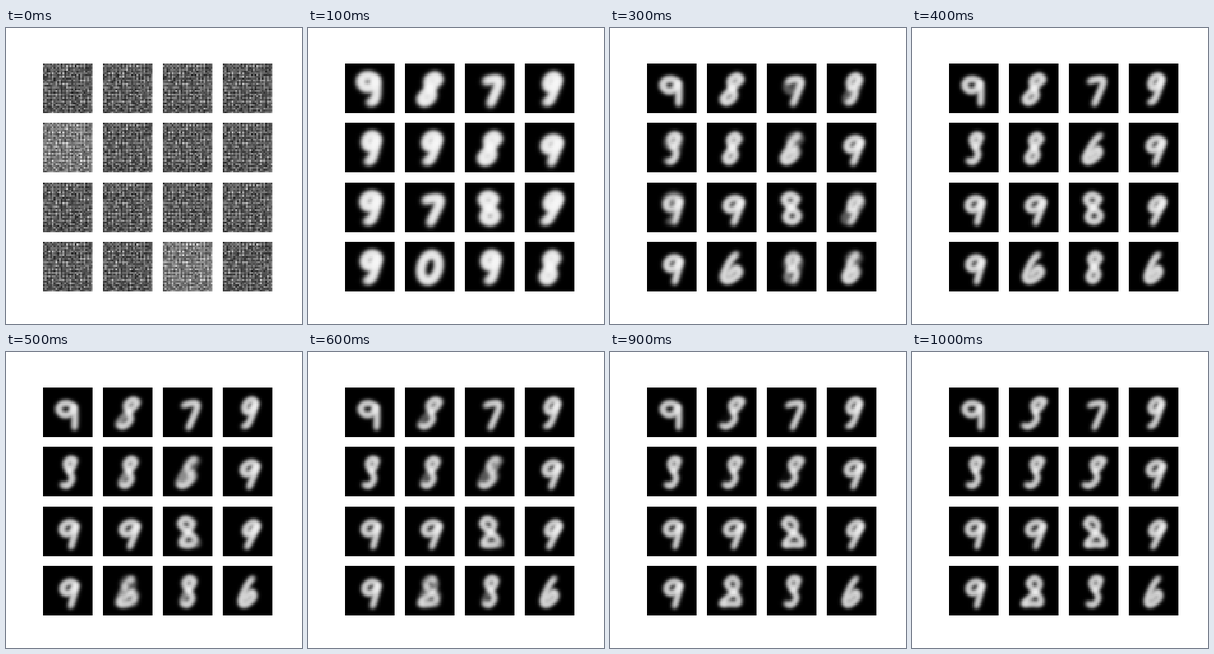
An HTML page with a canvas for the animation above (1.1 s loop, 400 by 400 pixels).

```html
<!DOCTYPE html>
<html lang="en">
<head>
<meta charset="utf-8">
<title>Generated digits</title>
<style>
  html, body { margin: 0; width: 100%; height: 100%; overflow: hidden; background: #fff; }
  canvas { display: block; width: 400px; height: 400px; }
</style>
</head>
<body>
<canvas id="stage" width="400" height="400"></canvas>
<script>
const GRID = 28, SIDE = 67, PITCH = 80.5, LEFT = 50, TOP = 48;
const STEP = 100, STEPS = 11;
const POSE_STEPS = [1, 2, 4, 10];

// Key points of each digit in a unit box; "|" separates strokes.
const LOOP = ".95,.12 .6,0 .2,.06 .02,.27 .25,.46 .62,.42 .95,.14|";
const GLYPHS = {
  0: ".5,0 .14,.14 0,.5 .14,.86 .5,1 .86,.86 1,.5 .86,.14 .5,0",
  2: ".1,.2 .4,0 .78,.2 .6,.52 .02,.95 .5,.95 1,.95 .85,.66 .45,.45 .1,.2",
  6: ".68,0 .35,.25 .08,.85 .45,1 1,.72 .75,.5 .35,.82",
  7: "0,.12 .3,.03 .97,.03 .88,.5 .65,1",
  8: ".9,.16 .5,0 .12,.18 .4,.44 .85,.75 .5,1 .1,.85 .5,.46 .9,.16",
  9: LOOP + ".97,.1 .9,.5 .75,1",
  g: LOOP + ".95,.12 .88,.5 .7,.9 .3,1",
  S: "1,.08 .5,0 .2,.2 .6,.5 .85,.75 .5,1 .02,.94|.85,.08 .8,.3 .5,.45"
};

// Digit at each pose step, then width and slant.
const TILES = [
  "g999 24 -6", "888S 20 14", "7977 20 7", "g8gg 16 9",
  "ggSS 17 4", "g88S 18 8", "886S 20 12", "9999 20 9",
  "gg99 21 4", "7999 22 8", "8882 25 -4", "g899 16 14",
  "g999 20 5", "0662 24 6", "g98S 18 3", "8866 19 7"
];

const mix = (a, b, t) => a + (b - a) * t;

// Catmull-Rom samples along a stroke.
function sample(stroke) {
  const pts = stroke.split(" ").map(p => p.split(",").map(Number));
  const at = i => pts[Math.max(0, Math.min(pts.length - 1, i))];
  const out = [];
  for (let s = 0; s <= pts.length - 1; s += 0.125) {
    const i = Math.floor(s), t = s - i;
    out.push([0, 1].map(k => {
      const [a, b, c, d] = [-1, 0, 1, 2].map(o => at(i + o)[k]);
      return b + t * ((c - a) / 2 + t * ((2 * a - 5 * b + 4 * c - d) / 2 + t * (3 * b - a - 3 * c + d) / 2));
    }));
  }
  return out;
}

const curves = {};
for (const name in GLYPHS) curves[name] = GLYPHS[name].split("|").map(sample);

// Ink spread around the strokes; early poses are softer and fuller.
function inkField(name, width, slant, time) {
  const soft = 4.2 + 1.4 / time, strength = 1.4 + 1.2 / time;
  const centre = 37 - width * 0.14;
  const low = "79".includes(name);
  const [top, bottom] = low ? [21, 56] : [16, 53];
  const place = ([u, v]) => [centre + width * (u - 0.5) + slant * (0.5 - v), mix(top, bottom, v)];
  const dabs = curves[name].flatMap(curve => {
    const pts = curve.map(place);
    return pts.slice(1).map(([x, y], i) => {
      const [px, py] = pts[i];
      return { x: (x + px) / 2, y: (y + py) / 2, length: Math.hypot(x - px, y - py) };
    });
  });
  return Float32Array.from({ length: GRID * GRID }, (_, i) => {
    const x = (i % GRID + 0.5) * SIDE / GRID;
    const y = (Math.floor(i / GRID) + 0.5) * SIDE / GRID;
    let ink = 0;
    for (const d of dabs) ink += d.length * Math.exp(-((d.x - x) ** 2 + (d.y - y) ** 2) / soft ** 2);
    return 0.97 * (1 - Math.exp(-strength * ink / (soft * Math.sqrt(Math.PI))));
  });
}

const poses = TILES.map(tile => {
  const [names, width, slant] = tile.split(" ");
  return POSE_STEPS.map((time, i) => ({ time, field: inkField(names[i], +width, +slant, time) }));
});

function random(seed) {
  let s = Math.imul(seed + 1, 2654435761);
  s = Math.imul(s ^ s >>> 15, 2246822519);
  s = Math.imul(s ^ s >>> 13, 3266489917);
  return ((s ^ s >>> 16) >>> 0) / 4294967296;
}

// Untrained output: a two-cell lattice, mostly shared by all tiles.
function noise(tile, i) {
  const odd = i % 2 + Math.floor(i / GRID) % 2;
  const grain = 0.7 * random(i) + 0.3 * random(i + 1000 * (tile + 1)) - 0.5;
  const lift = tile % 10 === 4 ? 0.12 : 0;
  return 0.26 + 0.11 * odd + lift + grain * (0.32 + 0.16 * odd);
}

function level(tile, step, i) {
  if (step === 0) return noise(tile, i);
  const list = poses[tile];
  const next = list.findIndex(p => p.time >= step);
  const b = list[next], a = list[Math.max(0, next - 1)];
  if (a === b) return a.field[i];
  const decay = t => 1 - 0.68 ** t;
  return mix(a.field[i], b.field[i], decay(step - a.time) / decay(b.time - a.time));
}

const ctx = document.getElementById("stage").getContext("2d");
const cell = document.createElement("canvas");
cell.width = cell.height = GRID;
const cellCtx = cell.getContext("2d");
const image = cellCtx.createImageData(GRID, GRID);

function draw(step) {
  ctx.fillStyle = "#fff";
  ctx.fillRect(0, 0, 400, 400);
  ctx.imageSmoothingEnabled = false;
  for (let tile = 0; tile < TILES.length; tile++) {
    for (let i = 0; i < GRID * GRID; i++) {
      const v = 255 * level(tile, step, i);
      image.data.set([v, v, v, 255], i * 4);
    }
    cellCtx.putImageData(image, 0, 0);
    const x = LEFT + Math.round(tile % 4 * (PITCH + 0.5));
    const y = TOP + Math.floor((tile >> 2) * PITCH);
    ctx.drawImage(cell, x, y, SIDE, SIDE);
  }
}

let start, shown = 0;
function tick(now) {
  start ??= now;
  const step = Math.floor((now - start) / STEP) % STEPS;
  if (step !== shown) draw(shown = step);
  requestAnimationFrame(tick);
}
draw(0);
requestAnimationFrame(tick);
</script>
</body>
</html>
```
